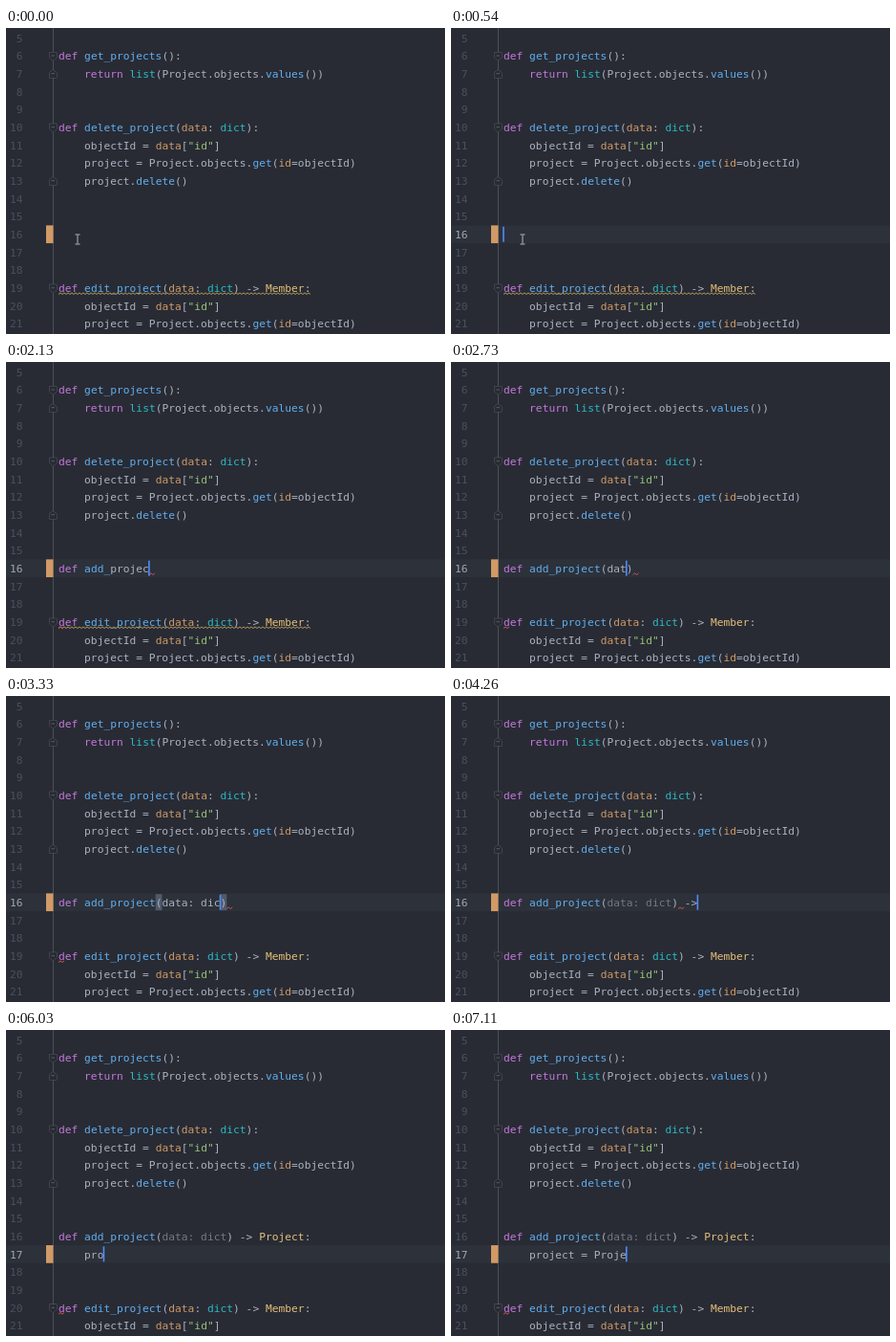
Write an HTML page with a canvas that moves like this. It is 460 px wide and 320 px high and loops after 7140 ms.

```html
<!DOCTYPE html>
<html lang="en">
<head>
<meta charset="utf-8">
<title>Typing a function</title>
<style>
html, body { margin: 0; width: 100%; height: 100%; overflow: hidden; background: #282b34; }
canvas { display: block; }
</style>
</head>
<body>
<canvas id="stage" width="460" height="320"></canvas>
<script>
const ctx = document.getElementById('stage').getContext('2d');
const LOOP = 7140, LEFT = 55, CHAR = 6.78, ROW = 18.67;
const COLORS = {
  k: '#c678dd', f: '#61afef', t: '#abb2bf', b: '#2bbac5', s: '#98c379',
  p: '#d19a66', c: '#e5c07b', d: '#737985'
};

// Each segment starts with its colour key.
const ABOVE = {
  6: 'kdef |fget_projects|t():',
  7: 'k    return |blist|t(Project.objects.|fvalues|t())',
  10: 'kdef |fdelete_project|t(|pdata|t: |bdict|t):',
  11: 't    objectId = |pdata|t[|s"id"|t]',
  12: 't    project = Project.objects.|fget|t(|pid|t=objectId)',
  13: 't    project.|fdelete|t()'
};
const BELOW = [
  'kdef |fedit_project|t(|pdata|t: |bdict|t) -> |cMember|t:',
  ABOVE[11],
  ABOVE[12]
];

// [time in ms, keys pressed]
const KEYS = [
  [560, 0], [1080, 5], [1230, 5], [2130, 14], [3330, 25], [4260, 30], [4890, 38],
  [5040, 39], [5300, 39], [5310, 40], [5600, 40], [6030, 43], [7110, 55]
];

function keysAt(t) {
  if (t <= KEYS[0][0]) return 0;
  const i = KEYS.findIndex(k => k[0] > t);
  if (i < 0) return 55;
  const [t0, n0] = KEYS[i - 1], [t1, n1] = KEYS[i];
  return Math.floor(n0 + (n1 - n0) * (t - t0) / (t1 - t0) + 0.3);
}

const mid = line => 29 + (line - 6) * ROW;
const colX = col => LEFT + col * CHAR;

function rect(color, x, y, w, h) {
  ctx.fillStyle = color;
  ctx.fillRect(x, y, w, h);
}

function code(line, text, limit = 99) {
  let col = 0;
  for (const part of text.split('|')) {
    const shown = part.slice(1, 1 + Math.max(0, limit - col));
    ctx.fillStyle = COLORS[part[0]];
    ctx.fillText(shown, colX(col), mid(line) + 4.2);
    col += part.length - 1;
  }
}

function path(color, points, close) {
  ctx.strokeStyle = color;
  ctx.lineWidth = 1;
  ctx.beginPath();
  points.forEach(([x, y]) => ctx.lineTo(x, y));
  if (close) ctx.closePath();
  ctx.stroke();
}

function squiggle(color, line, from, to) {
  const points = [], end = colX(to);
  for (let x = colX(from), i = 0; x <= end; x += 2, i++)
    points.push([x, mid(line) + (i % 2 ? 5.2 : 6.8)]);
  path(color, points);
}

function fold(line, dir) {
  const y = mid(line) + 0.5;
  const points = [[45.5, -4], [53, -4], [53, 1.5], [49.25, 4.5], [45.5, 1.5]];
  ctx.fillStyle = '#282b34';
  path('#565b64', points.map(([x, dy]) => [x, y + dy * dir]), true);
  ctx.fill();
  path('#565b64', [[47.5, y - 0.5], [51, y - 0.5]]);
}

function draw(t) {
  const n = keysAt(t);
  const entered = n >= 40;
  const row = entered ? 17 : 16;
  const active = t >= 330;
  const paired = n >= 16 && n < 27;
  const length = paired ? n + 1 : n;
  const editLine = entered ? 20 : 19;

  rect('#282b34', 0, 0, 460, 320);
  if (active) rect('#2c313a', 0, mid(row) - 9.3, 460, ROW);
  rect('#4b4f57', 49, 0, 1, 320);
  rect('#d19a66', 42, mid(row) - 9.3, 7.5, ROW);

  ctx.font = '11.26px "DejaVu Sans Mono", monospace';
  ctx.textAlign = 'right';
  for (let line = 5; line <= 21; line++) {
    ctx.fillStyle = active && line === row ? '#a0a6b1' : '#495060';
    ctx.fillText(line, 17.5, mid(line) + 4.2);
  }
  ctx.textAlign = 'left';

  for (const line in ABOVE) code(+line, ABOVE[line]);
  BELOW.forEach((text, i) => {
    if (editLine + i <= 21) code(editLine + i, text);
  });
  [6, 10, editLine].forEach(line => fold(line, 1));
  [7, 13].forEach(line => fold(line, -1));

  // Matching brackets around the caret
  if (n === 16 || n === 25 || n === 26 || n === 27) {
    rect('#515a6b', colX(15), mid(16) - 8.5, CHAR, 17);
    rect('#515a6b', colX(n === 27 ? 26 : n), mid(16) - 8.5, CHAR, 17);
  }

  const first = n >= 8 ? 'f' : 't', rest = n >= 15 ? 'f' : 't';
  const args = n >= 27 ? 'd' : 't';
  const head = `kdef |${first}add_|${rest}project|t(|${args}data: dict`;
  if (paired) {
    code(16, head, n);
    ctx.fillStyle = COLORS.t;
    ctx.fillText(')', colX(n), mid(16) + 4.2);
  } else {
    code(16, head + '|t) -> |cProject|t:', n);
  }
  if (entered) code(17, 't    project = Proje', n - 36);

  if (n < 16) squiggle('#b39a5c', editLine, 0, 39);
  if (n > 5 && n < 27 || n >= 39) squiggle('#d0525c', editLine, 0, 1);
  if (n > 5 && n < 39) {
    const col = Math.min(length, 27);
    squiggle('#d0525c', 16, col, col + 1);
  }

  if (active) rect('#528bff', colX(entered ? n - 36 : n) - 0.8, mid(row) - 8, 1.6, 16);
  if (n === 0) {
    path('#b4b7bd', [[75, 216.5], [75, 225.5]]);
    path('#b4b7bd', [[72.5, 216], [77.5, 216]]);
    path('#b4b7bd', [[72.5, 226], [77.5, 226]]);
  }
}

const start = performance.now();
function frame() {
  draw((performance.now() - start) % LOOP);
  requestAnimationFrame(frame);
}
frame();
</script>
</body>
</html>
```
